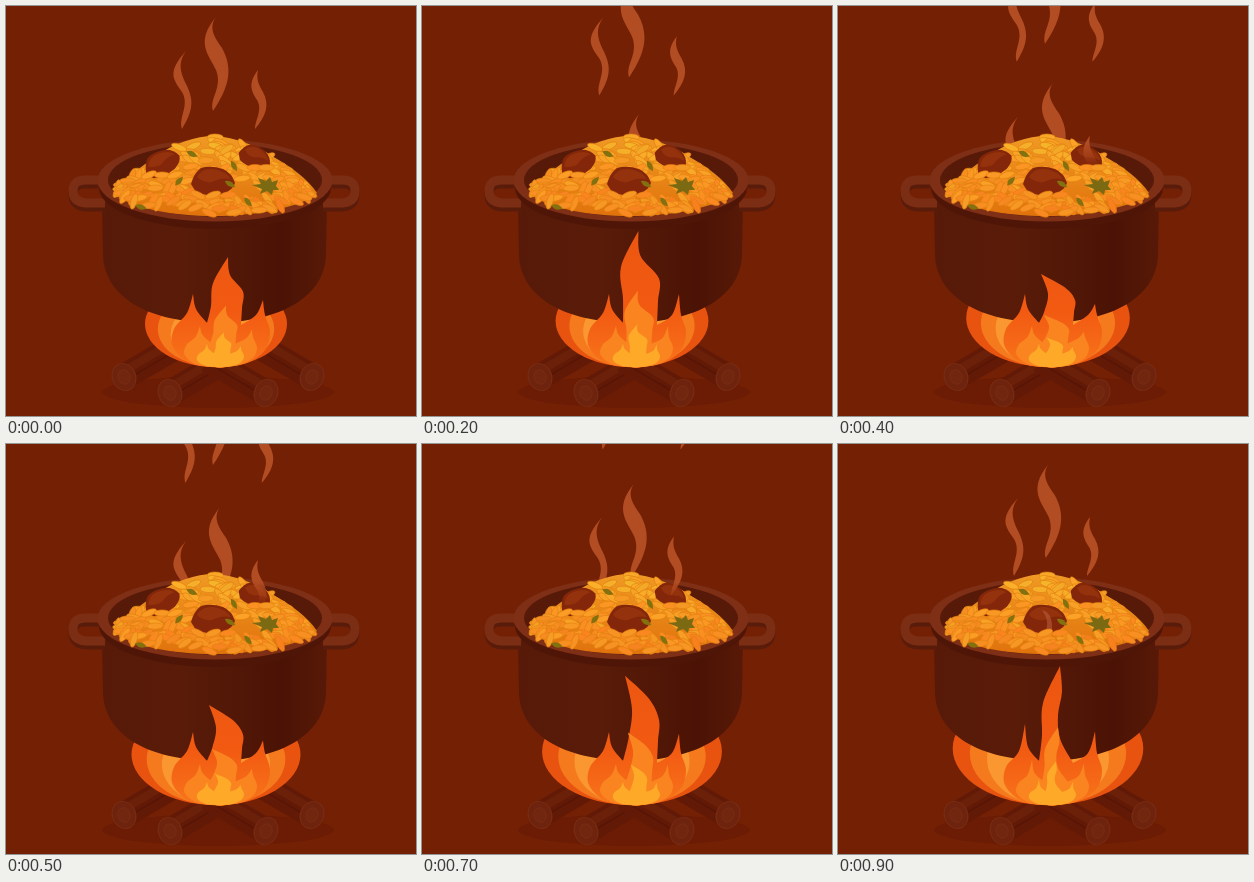
Animation of 410 by 410 pixels, one loop 1 s. Source, as an HTML page:

```html
<!DOCTYPE html>
<html lang="en">
<head>
<meta charset="utf-8">
<title>Pot of rice over a fire</title>
<style>
html, body { margin: 0; width: 100%; height: 100%; overflow: hidden; background: #742005; }
svg { display: block; width: 100vw; height: 100vh; }
</style>
</head>
<body>
<svg viewBox="0 0 410 410">
  <defs>
    <linearGradient id="body">
      <stop offset="0" stop-color="#571a08"/><stop offset=".35" stop-color="#5a1c09"/>
      <stop offset=".8" stop-color="#4b1305"/><stop offset="1" stop-color="#581907"/>
    </linearGradient>
    <linearGradient id="rice" x2="0" y2="1"><stop offset="0" stop-color="#f09a24"/><stop offset="1" stop-color="#e0720c"/></linearGradient>
    <linearGradient id="blaze" gradientUnits="userSpaceOnUse" x1="0" y1="225" x2="0" y2="360">
      <stop offset="0" stop-color="#ec5610"/><stop offset=".6" stop-color="#f25a12"/><stop offset="1" stop-color="#f8741a"/>
    </linearGradient>
    <linearGradient id="fade" gradientUnits="userSpaceOnUse" x1="0" y1="138" x2="0" y2="160">
      <stop offset="0" stop-color="#fff"/><stop offset="1"/>
    </linearGradient>
    <mask id="thin" maskUnits="userSpaceOnUse" x="0" y="-200" width="410" height="610">
      <rect y="-200" width="410" height="610" fill="url(#fade)"/>
    </mask>
    <path id="steam0" d="M180 45C172 56 174 65 179 76C188 93 188 103 176 123C172 111 184 100 176 86C168 74 160 67 180 45Z"/>
    <path id="steam1" d="M210 11C202 22 209 32 216 42C227 62 224 80 207 105C203 92 217 82 210 64C204 50 188 37 210 11Z"/>
    <path id="steam2" d="M252 64C250 74 253 79 257 86C264 99 260 110 249 123C249 114 257 104 251 94C246 86 241 78 252 64Z"/>
  </defs>

  <rect width="410" height="410" fill="#742005"/>
  <ellipse cx="212" cy="386" rx="116" ry="16" fill="#6c1c04"/>
  <g id="logs"></g>

  <g id="lobes">
    <ellipse fill="#e95310"/><ellipse fill="#f47a1d"/><ellipse fill="#fb9730"/>
  </g>

  <path fill="url(#body)" d="M96 195L97 250C99 290 140 316 208 317C276 316 318 290 320 250L321 195Z"/>
  <g fill="none" stroke-width="9">
    <path stroke="#5a1c0a" d="M100 178H79Q67 178 67 188Q67 200 80 201H99M316 178H337Q349 178 349 188Q349 200 336 201H317"/>
    <path stroke="#7c2e14" d="M100 174H79Q67 174 67 185Q67 196 80 197H99M316 174H337Q349 174 349 185Q349 196 336 197H317"/>
  </g>
  <ellipse cx="209" cy="182" rx="116" ry="41" fill="#4f1607"/>
  <ellipse cx="209" cy="174.500" rx="117.500" ry="41" fill="#7e2f15"/>
  <ellipse cx="209" cy="174" rx="107" ry="36.500" fill="#571a09"/>
  <g id="back" fill="#b24c22" mask="url(#thin)"></g>

  <path fill="url(#rice)" d="M107 187C118 172 136 161 150 150C168 137 190 130 208 130C230 131 250 140 266 150C284 160 302 173 311 187C294 202 250 210 208 210C166 210 124 202 107 187Z"/>
  <g id="grains"></g>
  <g id="chunks"></g>
  <path id="streak" fill="#b65c3a" opacity=".6" d="M204 166C212 168 215 176 214 187L207 188C211 181 209 173 204 166Z"/>
  <g id="cover"></g>
  <g id="herbs" fill="#83700f"></g>
  <path fill="#7c6a12" d="M246 179L255 178L252 172L260 175L264 171L266 176L272 174L270 180L273 184L267 184L266 189L261 185L254 188L256 183Z"/>
  <g id="front" fill="#b24c22" mask="url(#thin)"></g>

  <path id="f0" fill="url(#blaze)"/>
  <path id="f1" fill="#fa8520"/>
  <path id="f2" fill="#feaa28"/>
</svg>
<script>
const $ = id => document.getElementById(id);
const add = (parent, tag, attrs) => {
  const el = document.createElementNS('http://www.w3.org/2000/svg', tag);
  for (const k in attrs) el.setAttribute(k, attrs[k]);
  return parent.appendChild(el);
};
const smooth = (a, b, t) => {
  const k = Math.min(1, Math.max(0, (t - a) / (b - a)));
  return k * k * (3 - 2 * k);
};
let seed = 11;
const rand = () => (seed = (seed * 16807) % 2147483647) / 2147483647;

// A log runs from its cut end to a point under the flames
function log(x, y, side) {
  const line = (dy, w, c) => add($('logs'), 'line', {
    x1: x, y1: y + dy, x2: x - side * 58, y2: y + dy - 34, stroke: c, 'stroke-width': w
  });
  line(0, 26, '#621a07');
  line(-6, 8, '#6b2009');
  line(4, 1.5, '#581505');
  const disc = (r, fill, stroke) => add($('logs'), 'ellipse', {
    cx: x, cy: y, rx: r, ry: r * 1.2, fill, stroke, 'stroke-width': 1.2, transform: `rotate(${side * 24} ${x} ${y})`
  });
  disc(11.5, '#6d230d', '#762b12');
  disc(6, '#71270f', '#762b12');
}
for (const [reach, y] of [[94, 371], [48, 387]])
  for (const side of [-1, 1]) log(212 + side * reach, y, side);

// Rice heap: grains get a deeper orange towards the rim
function grain(parent, x, y, angle) {
  const g = Math.round(176 - (y - 128) * .5 + (rand() - .5) * 30);
  add(parent, 'ellipse', {
    rx: 8, ry: 3.1, fill: `rgb(${Math.round(244 + rand() * 8)},${g},${Math.round(g * .24)})`,
    stroke: '#e2800f', 'stroke-width': .6,
    transform: `translate(${x.toFixed(1)} ${y.toFixed(1)}) rotate(${angle.toFixed()})`
  });
}
const spots = Array.from({ length: 240 }, () => {
  const d = rand() * 1.9 - .95, a = Math.abs(d);
  const top = 131 + 55 * a ** 1.6, low = 207 - 22 * a ** 3;
  return [208 + 101 * d, top + (low - top) * rand(), d * 40 + (rand() - .5) * 100];
});
spots.sort((a, b) => a[1] - b[1]).forEach(s => grain($('grains'), ...s));

function meat(x, y, size, angle) {
  const g = add($('chunks'), 'g', { transform: `translate(${x} ${y}) rotate(${angle}) scale(${size})` });
  add(g, 'path', { fill: '#842609', d: 'M-22 3Q-19 -8 -12 -13Q-2 -16 10 -12Q19 -8 22 2Q20 9 10 13Q-6 16 -17 11Z' });
  add(g, 'path', { fill: '#93320d', d: 'M-16 -4Q-11 -13 0 -12Q13 -10 18 -2Q8 -4 -1 1Q-10 2 -16 -4Z' });
  for (let i = -1; i < 2; i++) grain($('cover'), x + i * 15 * size, y + 14 * size, rand() * 60 - 30);
}
meat(156, 157, .86, -28);
meat(207, 175, 1, 0);
meat(249, 151, .76, 22);

for (const [x, y, a] of [[173, 175, -50], [186, 148, 25], [228, 160, 60], [242, 196, 50], [224, 178, 30], [135, 201, 15]])
  add($('herbs'), 'path', { d: 'M-6 0Q-1 -5 6 0Q0 5 -6 0Z', transform: `translate(${x} ${y}) rotate(${a})` });

// Each wisp has a copy that leaves and one that rises into its place
const wisps = [.04, 0, .08].map((drift, i) => {
  const layer = $(i < 2 ? 'back' : 'front');
  const copy = () => add(layer, 'use', { href: '#steam' + i });
  return { drift, sway: i === 1 ? .08 : 0, old: copy(), young: copy() };
});

function drawSteam(t) {
  const up = 168 * t, down = 130 * (1 - t - .1 * Math.sin(Math.PI * t));
  for (const { drift, sway, old, young } of wisps) {
    old.setAttribute('transform', `translate(${up * drift} ${-up})`);
    young.setAttribute('transform', `translate(${down * sway} ${down})`);
  }
}

// Two tongues per loop: the first stretches and breaks off, the second rises and swings right
function tongue(t) {
  if (t < .4) return { x: 222 - 700 * t ** 3, y: 251 - 100 * t - 150 * t * t, left: 207 - 40 * t, bulge: 0, pinch: smooth(.2, .32, t) };
  const bulge = 1 - smooth(.7, .8, t);
  return { x: 222 - 19 * bulge, y: Math.min(268, 222 + 39 * ((.9 - t) / .4) ** 2), left: 205 + 5 * bulge, bulge, pinch: 1 - bulge };
}

// Smooth curve through points, sharp at both ends
const curve = p => p.slice(1).map((b, i) => {
  const a = p[i], z = p[i - 1] || a, c = p[i + 2] || b;
  const out = a.map((n, k) => n + (b[k] - z[k]) / 6), into = b.map((n, k) => n - (c[k] - a[k]) / 6);
  return 'C' + [...out, ...into, ...b].map(n => n.toFixed(1)).join(' ');
}).join('');

function flameRuns(t) {
  const { x, y, left, bulge, pinch } = tongue(t);
  const down = k => y + (320 - y) * k;
  const base = [214, 362], dipL = [201, 317], dipR = [235, 319], tip = [x, y];
  const tipL = [187, 288 - 8 * smooth(.7, .9, t)], tipR = [257, 284 + (y - 207) * .23];
  return [
    [base, [184, 357], [167, 341], [168, 323], [181, 307], tipL],
    [tipL, [190, 303], dipL],
    [dipL, [(left + 203) / 2, down(.71)], [left, down(.38)], tip],
    [tip, [x + 2 + 22 * bulge, down(.26)], [237 - 17 * pinch, down(.5)], [236 - 14 * pinch, down(.74)], dipR],
    [dipR, [250, 309], tipR],
    [tipR, [259, 309], [264, 326], [259, 344], [241, 357], base]
  ];
}

function drawFire(t) {
  const rx = 71 + 27 * t, cy = 318 - 15 * t;
  [...$('lobes').children].forEach((el, n) => {
    const y = cy + n * 5;
    const size = { cx: 210, cy: y, rx: rx * (1 - n * .18), ry: 361 - y };
    for (const k in size) el.setAttribute(k, size[k]);
  });
  const runs = flameRuns(t);
  for (let n = 0; n < 3; n++) {
    const sx = 1 - n * .26, sy = .56 ** n;
    const path = runs.map(r => r.map(([x, y]) => [214 + (x - 214) * sx, 361 + (y - 361) * sy]));
    $('f' + n).setAttribute('d', 'M' + path[0][0].join(' ') + path.map(curve).join('') + 'Z');
  }
}

let last = -1;
function tick() {
  const step = Math.floor(performance.now() % 1000 / 100);
  if (step !== last) {
    last = step;
    drawSteam(step / 10);
    drawFire(step / 10);
    $('streak').style.display = step > 7 ? '' : 'none';
  }
  requestAnimationFrame(tick);
}
tick();
</script>
</body>
</html>
```
